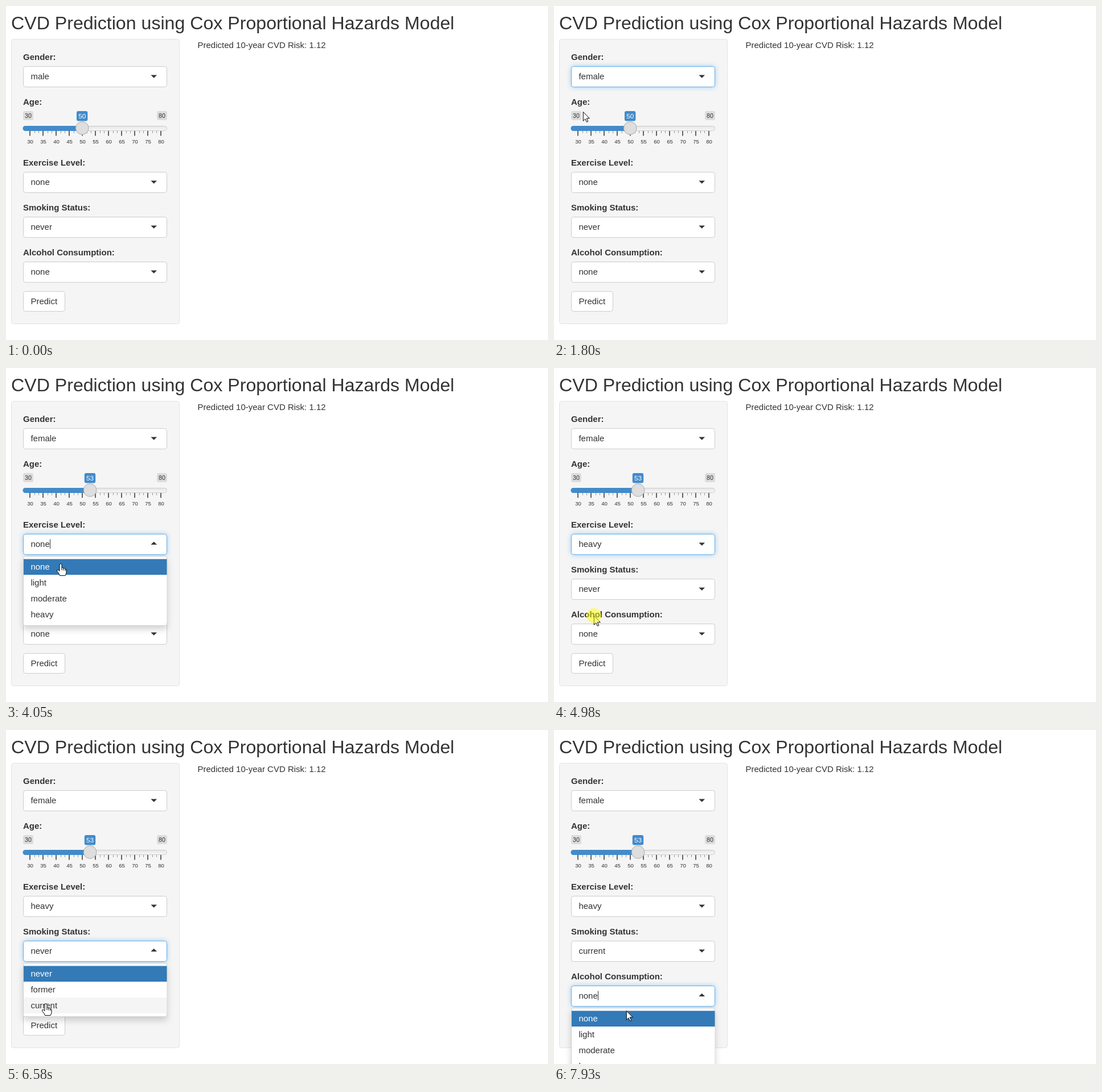
Write an HTML page that moves like this. It is 952 by 588 pixels and loops after 8000 ms.

```html
<!DOCTYPE html>
<html lang="en">
<head>
<meta charset="utf-8">
<title>CVD Prediction</title>
<style>
  html, body { margin: 0; width: 100%; height: 100%; overflow: hidden; background: #fff; }
  svg { display: block; width: 952px; height: 588px; }
  text { font: 15px "Liberation Sans", Arial, sans-serif; fill: #333; white-space: pre; }
  .title { font-size: 32.14px; }
  .label { font-weight: bold; }
  .box { fill: #fff; stroke: #ccc; }
  .focus .box { stroke: #66afe9; filter: drop-shadow(0 0 4px rgba(102, 175, 233, .6)); }
  .menu { fill: #fff; stroke: #d0d0d0; filter: drop-shadow(0 6px 6px rgba(0, 0, 0, .175)); }
  .small { font-size: 10.7px; text-anchor: middle; }
  .value { font-size: 11.8px; text-anchor: middle; fill: #fff; }
  .tick { font-size: 9.64px; text-anchor: middle; }
  .cursor { fill: #fff; stroke: #000; stroke-linejoin: round; }
</style>
</head>
<body>
<svg id="stage" viewBox="0 0 952 588">
  <defs>
    <linearGradient id="groove" x2="0" y2="1">
      <stop stop-color="#e6e6e6"/><stop offset="1" stop-color="#f7f7f7"/>
    </linearGradient>
  </defs>
</svg>
<script>
const LOOP = 8000;
const stage = document.getElementById('stage');

function add(parent, tag, attrs, content) {
  const el = document.createElementNS('http://www.w3.org/2000/svg', tag);
  set(el, attrs);
  if (content !== undefined) el.textContent = content;
  parent.append(el);
  return el;
}
function set(el, attrs) {
  for (const key in attrs) el.setAttribute(key, attrs[key]);
}
const show = (el, on) => { el.style.display = on ? '' : 'none'; };
const rect = (parent, x, y, width, height, rx, more) =>
  add(parent, 'rect', { x, y, width, height, rx, ...more });
const text = (parent, x, y, content, cls = '') =>
  add(parent, 'text', { x, y, class: cls }, content);
const within = (t, [from, to]) => t >= from && t < to;

// Page
text(stage, 9, 41, 'CVD Prediction using Cox Proportional Hazards Model', 'title');
rect(stage, 9.5, 58.5, 295, 501, 4, { fill: '#f5f5f5', stroke: '#e3e3e3' });
text(stage, 336.5, 74, 'Predicted 10-year CVD Risk: 1.12');

// Age slider
const ageX = age => 42 + (age - 30) * 4.6;
text(stage, 30, 174, 'Age:', 'label');
for (const [x, age] of [[30, 30], [265, 80]]) {
  rect(stage, x, 185, 18, 16, 3, { fill: '#dcdcdc' });
  text(stage, x + 9, 197, age, 'small');
}
rect(stage, 30.5, 211.5, 252, 8, 4, { fill: 'url(#groove)', stroke: '#ccc' });
const bar = add(stage, 'path', { fill: '#428bca' });
for (let i = 0; i <= 30; i++) {
  const big = i % 3 === 0;
  const x = Math.round(42 + i * 23 / 3) - (big ? 0.5 : 0);
  add(stage, 'path', {
    d: `M${x + 0.5} 220V${big ? 228.5 : 224}`,
    stroke: big ? '#000' : '#999', 'stroke-width': big ? 1.2 : 1
  });
  if (big) text(stage, x + 1, 242, 30 + i / 3 * 5, 'tick');
}
const badge = add(stage, 'g', {});
rect(badge, -9.7, 185, 19.4, 17.4, 3, { fill: '#428bca' });
const badgeText = text(badge, 0, 197.5, 50, 'value');
const handle = add(stage, 'circle', { cy: 215, r: 11.3, stroke: '#ababab' });

rect(stage, 30.5, 502.5, 73, 35, 4, { class: 'box' });
text(stage, 43.4, 525, 'Predict');

// Select fields
const LEVELS = ['none', 'light', 'moderate', 'heavy'];
const fields = [
  { label: 'Gender:', y: 106, options: ['male', 'female'], pick: 1,
    open: [920, 1750], focus: [920, 2660] },
  { label: 'Exercise Level:', y: 292, options: LEVELS, pick: 3,
    open: [3720, 4980], focus: [3720, 5660] },
  { label: 'Smoking Status:', y: 371, options: ['never', 'former', 'current'], pick: 2,
    open: [5660, 7060], focus: [5660, 7740] },
  { label: 'Alcohol Consumption:', y: 450, options: LEVELS, pick: 0,
    open: [7740, LOOP], focus: [7740, LOOP] }
];
const ROW = 27.86;

for (const f of fields) {
  text(stage, 30, f.y - 11, f.label, 'label');
  f.group = add(stage, 'g', {});
  rect(f.group, 30.5, f.y + 0.5, 252, 36, 4, { class: 'box' });
  f.value = text(f.group, 43.4, f.y + 23, f.options[0]);
  f.arrow = add(f.group, 'path', { fill: '#333' });
  f.caret = add(f.group, 'path', { d: `M77.5 ${f.y + 9.5}v16.5`, stroke: '#333' });
}
for (const f of fields) {
  f.menu = add(stage, 'g', {});
  const top = f.y + 44.4;
  rect(f.menu, 30.5, f.y + 39.5, 252, f.options.length * ROW + 10.5, 3, { class: 'menu' });
  f.rows = f.options.map((name, i) => {
    const y = top + i * ROW;
    const row = rect(f.menu, 31, y, 251.5, ROW, 0, { fill: i ? '#fff' : '#337ab7' });
    const item = text(f.menu, 43.4, Math.round(y + 19), name);
    if (!i) item.style.fill = '#fff';
    return { row, y };
  });
}

// Pointer shapes, each with its hot spot at the origin
const pointer = add(stage, 'g', {});
const shapes = {
  arrow: add(pointer, 'path', { class: 'cursor',
    d: 'M.3 .5V16.3L3.9 12.8 6.4 18.3 8.8 17.2 6.3 11.8H11.3Z' }),
  hand: add(pointer, 'path', { class: 'cursor',
    d: 'M-2 2Q0-1 2 2V8Q4 6.8 5 8.7 7 7.8 8 9.8 10 9.6 10 12V16Q9.7 19 8 21.5H-1.5' +
       'Q-2.5 18-6.2 14 -7.3 11-4.5 11.2L-2 13.5ZM2 8V12M5 9V12.5M8 10V13' }),
  beam: add(pointer, 'path', { fill: 'none', stroke: '#222', 'stroke-width': 1.3,
    d: 'M-2-7.5H1L2-6.8 3-7.5H6M2-7V9M-2 9.5H1L2 8.8 3 9.5H6' })
};
const halo = add(pointer, 'circle', { r: 13, fill: '#ff0', 'fill-opacity': 0.5 });

// time, x, y, pointer shape from then on
const path = [
  [140, 875, 575, 'arrow'],
  [480, 390, 270, 'arrow'],
  [730, 185, 145, 'hand'],
  [870, 156, 133, 'hand'],
  [920, 156, 133, 'beam'],
  [1200, 156, 133, 'beam'],
  [1270, 140, 143, 'arrow'],
  [1330, 110, 156, 'hand'],
  [1550, 50, 185, 'hand'],
  [1750, 50, 185, 'arrow'],
  [1850, 52, 186, 'arrow'],
  [2130, 133, 206, 'hand'],
  [2180, 138, 208, 'hand'],
  [2330, 138, 208, 'hand'],
  [2460, 134, 224, 'hand'],
  [2660, 134, 224, 'hand'],
  [2810, 146, 223, 'hand'],
  [2860, 150, 224, 'hand'],
  [3140, 150, 224, 'arrow'],
  [3340, 122, 293, 'hand'],
  [3420, 115, 315, 'hand'],
  [3720, 115, 315, 'beam'],
  [3970, 115, 315, 'beam'],
  [4010, 105, 331, 'hand'],
  [4050, 96, 344, 'hand'],
  [4250, 89, 376, 'hand'],
  [4450, 89, 376, 'hand'],
  [4730, 70, 436, 'hand'],
  [4980, 70, 436, 'arrow'],
  [5110, 70, 436, 'arrow'],
  [5400, 116, 402, 'hand'],
  [5560, 131, 384, 'hand'],
  [5610, 132, 386, 'hand'],
  [5660, 132, 386, 'beam'],
  [5710, 131, 386, 'beam'],
  [5760, 134, 386, 'beam'],
  [5900, 134, 386, 'beam'],
  [6080, 118, 409, 'arrow'],
  [6140, 111, 418, 'hand'],
  [6580, 70, 481, 'hand'],
  [6730, 69, 482, 'hand'],
  [6830, 65, 488, 'hand'],
  [7060, 65, 488, 'arrow'],
  [7140, 65, 488, 'arrow'],
  [7340, 88, 400, 'hand'],
  [7420, 96, 418, 'arrow'],
  [7520, 107, 452, 'hand'],
  [7640, 113, 468, 'hand'],
  [7740, 113, 468, 'beam'],
  [7790, 113, 468, 'beam'],
  [7870, 121, 484, 'arrow'],
  [7930, 127, 494, 'arrow'],
  [LOOP, 127, 494, 'arrow']
];
const presses = [[870, 1020], [1700, 1800], [2460, 3140], [3670, 3820],
                 [4930, 5030], [5610, 5710], [7010, 7110], [7690, 7790]];
const ages = [[0, 50], [2710, 51], [2760, 52], [2860, 53]];

function pointerAt(t) {
  const i = path.findIndex(p => p[0] > t);
  const [t0, x0, y0, kind] = path[i - 1];
  const [t1, x1, y1] = path[i];
  const k = (t - t0) / (t1 - t0);
  return { x: Math.round(x0 + (x1 - x0) * k), y: Math.round(y0 + (y1 - y0) * k), kind };
}

function drawField(f, t, pos) {
  const open = within(t, f.open);
  f.value.textContent = f.options[t >= f.open[1] ? f.pick : 0];
  f.group.setAttribute('class', within(t, f.focus) ? 'focus' : '');
  f.arrow.setAttribute('d', open
    ? `M254.4 ${f.y + 19}h10.7l-5.35-5.3z`
    : `M254.4 ${f.y + 15.4}h10.7l-5.35 5.3z`);
  show(f.caret, open && (t - f.open[0]) % 1000 < 500);
  show(f.menu, open);
  f.rows.forEach(({ row, y }, i) => {
    const hover = pos && pos.y >= y && pos.y < y + ROW;
    if (i) row.setAttribute('fill', hover ? '#f5f5f5' : '#fff');
  });
}

function draw(t) {
  const pos = t < path[0][0] ? null : pointerAt(t);
  fields.forEach(f => drawField(f, t, pos));

  const age = ages.filter(a => a[0] <= t).pop()[1];
  const x = ageX(age);
  bar.setAttribute('d', `M${x} 211H34a4.3 4.3 0 0 0 0 9H${x}z`);
  badge.setAttribute('transform', `translate(${x - 0.3})`);
  badgeText.textContent = age;
  set(handle, { cx: x - 0.2, fill: within(t, [2130, 3140]) ? '#fff' : '#dedede' });

  show(pointer, pos);
  if (!pos) return;
  pointer.setAttribute('transform', `translate(${pos.x} ${pos.y})`);
  for (const kind in shapes) show(shapes[kind], kind === pos.kind);
  show(halo, presses.some(p => within(t, p)));
}

const start = performance.now();
function frame() {
  draw((performance.now() - start) % LOOP);
  requestAnimationFrame(frame);
}
frame();
</script>
</body>
</html>
```
